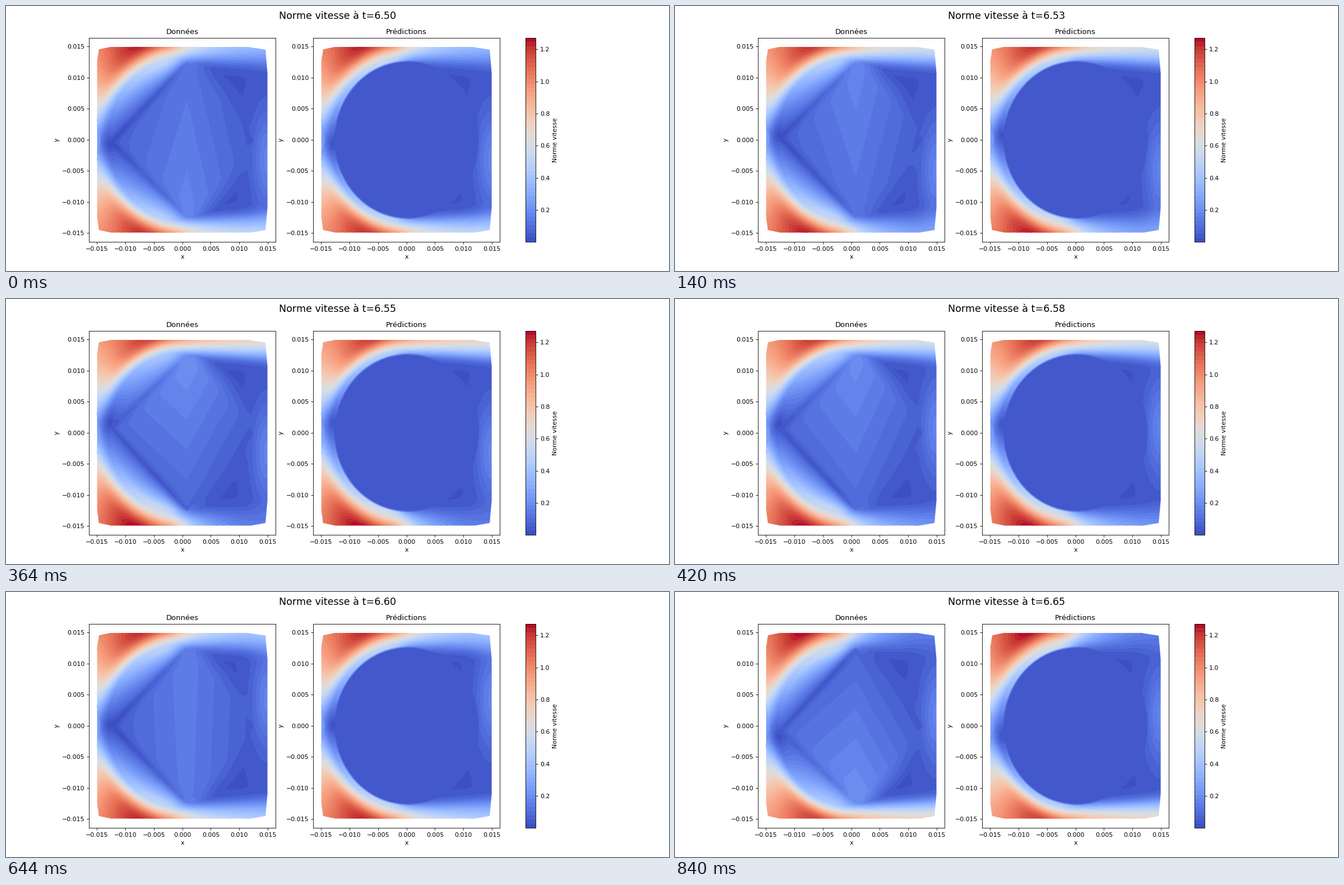
Write a matplotlib script that moves like this. It is 1183 px wide and 473 px high and loops after 980 ms.

```python
import numpy as np
import matplotlib.pyplot as plt
from matplotlib.animation import FuncAnimation
from matplotlib.patches import Polygon

DPI = 78.875
FRAMES, INTERVAL = 7, 140
T0, DT, PERIOD = 6.5, 0.025, 0.18
R, U = 12.6, 0.93                     # cylinder radius (mm), inflow speed
LEVELS = np.linspace(0.001, 1.2716, 50)
LIM = 0.0164

# outline of the meshed area, in mm
HULL = [(-14.63, 14.55), (-12.6, 14.93), (11.5, 14.93), (14.6, 14.5),
        (14.95, 10.7), (14.95, -10.9), (14.6, -14.5), (12, -14.91),
        (-12.5, -14.91), (-14.65, -14.5), (-14.95, -12.4), (-14.95, 12.7)]

X, Y = np.meshgrid(np.linspace(-15.1, 15.1, 300), np.linspace(-15.1, 15.1, 330))
RAD = np.hypot(X, Y) + 1e-9


def swing(t, peak):
    return np.cos(2 * np.pi * (t - peak) / PERIOD)


def outer_flow(t):
    """Speed outside the cylinder; inside, the value at the nearest wall point."""
    s, q = swing(t, 6.557), swing(t, 6.552)
    push = np.maximum(1, R / RAD)
    x, y = X * push, Y * push
    r = np.maximum(RAD, R)
    k = (R / r) ** 2

    # potential flow with an oscillating circulation and a boundary layer
    gam = 0.286 * U * s * (R / r) ** 3
    u = U * (1 - k * (x**2 - y**2) / r**2) - gam * y / r
    v = -U * k * 2 * x * y / r**2 + gam * x / r
    side = np.tanh(y / 3)
    delta = (3.4 + 0.1 * np.minimum(x, 0)) * (1 - 0.17 * s * side)
    front = np.hypot(u, v) * (1 - 0.72 * np.exp(-((r - R) / delta) ** 2))

    # thin wedge between the hull and the first mesh points
    wedge = (x < -14.95 + 0.55 * (1 - np.abs(y) / 3.3)) & (np.abs(y) < 3.3)
    front = np.where(wedge, 0.25 - 0.08 * s * y / 3.3, front)

    # shear layers and slow wake behind the cylinder
    xr = np.maximum(x, 0)
    kq = q * side
    jet = 0.45 + 0.36 * kq + (0.32 - 0.18 * kq) * np.exp(-np.maximum(x, -3) / 5)
    h = np.abs(y) - (12.6 - 0.1 * xr) + 0.4
    h = np.log1p(np.exp(2 * h)) / 2
    rise = 1 - np.exp(-(h / (1.9 + 0.1 * xr)) ** 1.5)
    yc = 5 * swing(t, 6.615)
    wake = 0.025 + 0.14 * np.exp(-((x - 15) / 2.7) ** 2 - ((y - yc) / 8) ** 2)
    back = 1.12 * jet * rise + wake

    w = 1 / (1 + np.exp(-(x + 1) / 0.9))
    return front * (1 - w) + back * w, w


def data_field(t):
    """Hollow cylinder filled by four large interpolated triangles."""
    s = swing(t, 6.557)
    out, w = outer_flow(t)
    top, bottom = 0.145 + 0.07 * s, 0.145 - 0.07 * s
    left = X < 0.8
    a = np.where(left, (0.8 - X) / 13.3, (X - 0.8) / 11.7)
    tip = np.where(left, 0.05 + 0.04 * s * s, 0.04)
    tip_y = np.where(left, 0.8 * s, 0)
    yy = (Y - a * tip_y) / 12.5
    flat = (1 - a) * (top + bottom) / 2 + (top - bottom) / 2 * yy + a * tip

    n = a + np.abs(yy) - 1
    n_wall = np.maximum((n + 1) * R / RAD - 1, 0.02)
    e = np.clip(n / n_wall, 0, 1)
    dip = 0.05 * np.exp(-(n / 0.09) ** 2) * (1 - w) * (1 - e)
    fill = flat + (out - flat) * e ** 1.2 - dip
    return np.where(RAD < R, fill, out)


def predicted_field(t):
    """Nearly still inside the cylinder, with a sharp wall."""
    out, w = outer_flow(t)
    d = RAD - R
    rim = 0.08 * np.exp(-(d / 0.4) ** 2) * (1 - w) * np.minimum(1, np.abs(Y) / 5)
    e = np.clip((d + 0.1) / 0.4, 0, 1)
    return 0.03 + (out + rim - 0.03) * e


def draw_field(ax, z):
    z = np.clip(z, LEVELS[0], LEVELS[-1])
    cs = ax.contourf(X / 1000, Y / 1000, z, levels=LEVELS, cmap="coolwarm")
    hull = Polygon(np.array(HULL) / 1000, transform=ax.transData)
    cs.set_clip_path(hull)
    cs.set_visible(False)
    return cs


fig, axes = plt.subplots(1, 2, figsize=(1183.01 / DPI, 473.01 / DPI), dpi=DPI)
title = fig.suptitle("", fontsize=16)
times = [T0 + DT * i for i in range(FRAMES)]
panels = [(axes[0], "Données", data_field), (axes[1], "Prédictions", predicted_field)]
layers = [[draw_field(ax, field(t)) for ax, _, field in panels] for t in times]

for ax, name, _ in panels:
    ax.set(title=name, xlabel="x", ylabel="y", xlim=(-LIM, LIM), ylim=(-LIM, LIM))
    ax.set_xticks(np.arange(-3, 4) * 0.005)
    ax.set_yticks(np.arange(-3, 4) * 0.005)

fig.colorbar(layers[0][0], ax=list(axes), label="Norme vitesse",
             ticks=np.arange(1, 7) * 0.2, format="%.1f")


def update(i):
    for j, pair in enumerate(layers):
        for cs in pair:
            cs.set_visible(j == i)
    title.set_text(f"Norme vitesse à t={times[i] + 1e-6:.2f}")
    return [title, *layers[i]]


anim = FuncAnimation(fig, update, frames=FRAMES, interval=INTERVAL,
                     init_func=lambda: update(0), repeat=True, repeat_delay=0)
plt.show()
```
